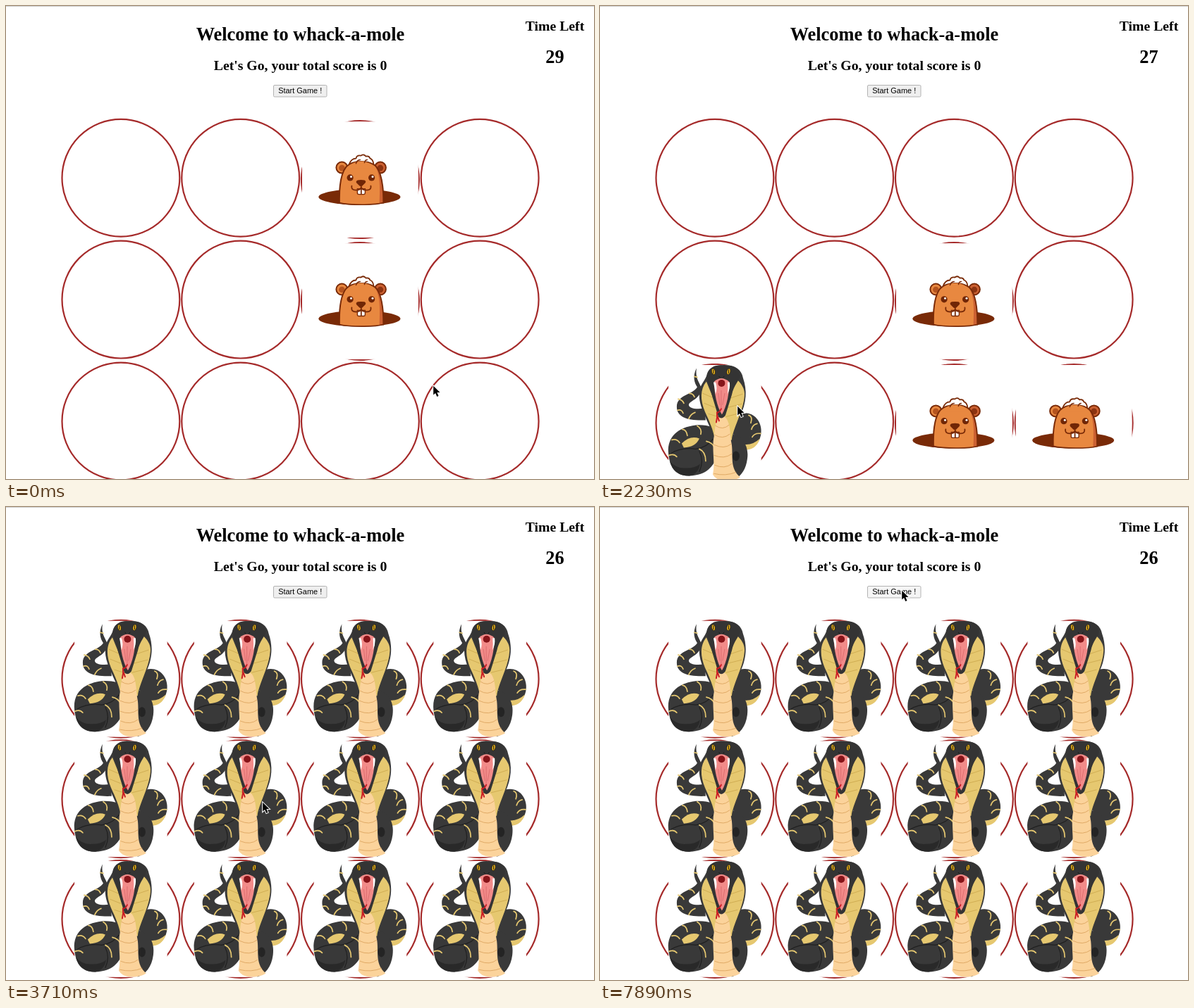
Animation, 834 px wide and 672 px high, one loop 8000 ms. Source, as an HTML page:

```html
<!DOCTYPE html>
<html lang="en">
<head>
<meta charset="utf-8">
<title>Whack-a-mole</title>
<style>
  html, body { margin: 0; width: 100%; height: 100%; overflow: hidden; background: #fff; }
  svg { display: block; width: 834px; height: 672px; }
  .title { font: bold 26.35px "Liberation Serif", "Times New Roman", serif; text-anchor: middle; }
  .sub { font: bold 19.75px "Liberation Serif", "Times New Roman", serif; text-anchor: middle; }
  .label { font: 10.95px "Liberation Sans", Arial, sans-serif; text-anchor: middle; }
  .line { fill: none; stroke-linecap: round; stroke-linejoin: round; }
</style>
</head>
<body>
<svg viewBox="0 0 834 672">
  <defs>
    <clipPath id="dome"><path d="M-29.5 33C-30 10-28-8-20-18C-11-28 14-28 23-18C31-8 33 10 33 33C21 36.5-15 36.5-29.5 33Z"/></clipPath>

    <g id="mole">
      <rect x="-82.4" y="-82.4" width="164.8" height="164.8" fill="#fff"/>
      <ellipse cx="-1" cy="24.7" rx="58" ry="11.2" fill="#792a07"/>
      <g stroke="#792a07" stroke-width="2">
        <circle cx="-26" cy="-17" r="8" fill="#e88840"/>
        <circle cx="28.5" cy="-17" r="8" fill="#cc6132"/>
      </g>
      <circle cx="-26" cy="-16.5" r="4.3" fill="#b4531f"/>
      <circle cx="28.5" cy="-16.5" r="4.3" fill="#8c3411"/>
      <g clip-path="url(#dome)">
        <rect x="-31" y="-30" width="66" height="68" fill="#e88840"/>
        <path d="M14-28C30-14 28 8 27 38H36V-30Z" fill="#cc6132"/>
      </g>
      <path class="line" d="M-29.5 33C-30 10-28-8-20-18C-11-28 14-28 23-18C31-8 33 10 33 33" stroke="#792a07" stroke-width="2"/>
      <path class="line" d="M-29.5 33C-15 36.5 21 36.5 33 33" stroke="#792a07" stroke-width="1.6"/>
      <path class="line" d="M-16-21Q-13-30-6-30Q-5-35 1-34Q5-37 8-33Q13-34 14-30Q18-29 19-22" fill="#e88840" stroke="#792a07" stroke-width="1.8"/>
      <path d="M-16-20Q2-32 19-20L16-16H-13Z" fill="#e88840"/>
      <path class="line" d="M-6-23Q-4-28 0-28M6-24Q7-28 10-28" stroke="#792a07" stroke-width="1.5"/>
      <g fill="#702606">
        <circle cx="-14.3" cy="-2.7" r="4.6"/>
        <circle cx="16.2" cy="-2.7" r="4.6"/>
        <path d="M-3.5.8Q1 .1 6 .8Q9 2 7 5L3 9Q1 10.500-1 9L-5 5Q-7 2-3.500 .8Z"/>
      </g>
      <circle cx="-12.9" cy="-4.2" r="1.5" fill="#fff"/>
      <circle cx="17.6" cy="-4.2" r="1.5" fill="#fff"/>
      <path d="M-4 13H7V19Q7 21 5 21H-2Q-4 21-4 19Z" fill="#fff" stroke="#792a07" stroke-width="1.4"/>
      <path class="line" d="M1.4 9V20M-12 9Q-13 15-6 15Q0 15 1.4 11Q3 15 9 15Q16 15 15 9" stroke="#792a07" stroke-width="1.8"/>
    </g>

    <g id="snake">
      <rect x="-65.8" y="-82.4" width="131.6" height="164.8" fill="#fff"/>
      <g transform="translate(-163 -244)">
        <g fill="#393939">
          <path d="M137 166C131 178 134 187 138 193C131 204 109 204 109 221C109 236 125 241 150 240L148 223C136 225 126 223 126 218C127 212 146 209 143 192C140 184 135 180 137 166Z"/>
          <path d="M198 231C218 225 232 243 228 262C225 276 214 283 204 281L188 258Z"/>
        </g>
        <path d="M202 274Q215 277 227 266Q221 283 205 282Z" fill="#e6c870"/>
        <path d="M97 285C96 264 110 250 136 247C152 246 166 250 168 258V287C161 306 152 318 127 319C106 320 98 304 97 285Z" fill="#393939"/>
        <path d="M99 298Q108 309 122 308Q136 308 142 302Q140 316 127 319Q104 319 99 298Z" fill="#292929"/>
        <path d="M116 273Q128 261 141 266Q136 278 119 279Z" fill="#e6c870"/>
        <path class="line" d="M101 287Q116 278 136 281Q153 278 160 267M141 284Q148 298 141 313" stroke="#202020" stroke-width="1.2"/>
        <path class="line" d="M111 210Q117 211 119 216M110 226Q116 224 118 230M126 238Q129 231 135 229M127 202Q132 202 134 207M134 178L138 179M102 268Q109 266 113 272M117 253Q123 254 124 262M138 248Q145 252 143 260M98 290Q105 287 109 292M141 281Q150 285 150 298M151 270Q160 272 163 280M211 233Q217 235 214 244M223 245Q217 246 215 253M228 259Q219 258 216 264" stroke="#e6c870" stroke-width="1.7"/>
        <path d="M184 260C201 260 212 276 209 295C207 312 198 322 187 326L173 300Z" fill="#393939"/>
        <ellipse cx="193" cy="291" rx="5" ry="7" fill="#242424"/>
        <path d="M152 174C155 164 168 161 178 162C192 162 201 168 203 180C209 197 208 215 199 234C194 246 189 256 188 270L163 268C155 242 139 222 141 200C142 188 150 184 152 174Z" fill="#393939"/>
        <path d="M151 185C142 196 142 211 149 228C155 241 161 254 163 268H187C188 253 204 226 205 205C206 196 201 188 194 182L173 239Z" fill="#e6c870"/>
        <path class="line" d="M146 202L160 208M148 216L163 222M154 231L167 235M202 203L184 209M201 217L181 222M195 231L179 235" stroke="#c9a64c" stroke-width=".8"/>
        <path d="M167 238Q173 231 179 237C186 247 184 260 187 275C189 292 184 308 199 321Q190 327 176 326Q164 325 160 317C164 300 158 280 162 262Q163 246 167 238Z" fill="#fbd39b"/>
        <path class="line" d="M164 248Q174 255 183 247M163 261Q174 268 184 260M162 275Q176 282 186 274M162 290Q176 296 187 288M163 304Q177 310 187 302M162 316Q178 320 193 314" stroke="#dda560" stroke-width=".9"/>
        <path d="M152 175C155 164 165 161 174 162C188 161 197 165 199 176C198 184 190 189 187 204L178 233Q173 240 168 235L159 205C157 191 151 185 152 175Z" fill="#343434"/>
        <path d="M162 185Q172 176 183 185C184 201 180 220 173 232C166 221 162 202 162 185Z" fill="#f28b89"/>
        <circle cx="172.500" cy="187.500" r="5" fill="#861419"/>
        <path class="line" d="M172 198V224M168 202L170 218M177 202L174 218" stroke="#d9686a" stroke-width=".8"/>
        <path d="M161 186Q163 195 164 203Q167 194 164 186ZM181 186Q182 195 181 203Q185 195 184 186Z" fill="#fff"/>
        <path class="line" d="M172 224Q169 230 166 229Q167 236 165 243M167 235L169 241" stroke="#ca1d24" stroke-width="2"/>
        <g fill="#f0b820" stroke="#111" stroke-width=".7">
          <ellipse cx="161" cy="171" rx="2.6" ry="4.4" transform="rotate(-12 161 171)"/>
          <ellipse cx="182.5" cy="171" rx="2.6" ry="4.4" transform="rotate(12 182.5 171)"/>
        </g>
        <path class="line" d="M161 168.5V173.5M182.5 168.5V173.5M169 178L170 179M176 178L175 179" stroke="#111" stroke-width="1"/>
      </g>
    </g>
  </defs>

  <rect width="834" height="672" fill="#fff"/>
  <rect width="834" height="1" fill="#cfcfcf"/>
  <text class="title" x="417.5" y="49">Welcome to whack-a-mole</text>
  <text class="sub" x="417.5" y="91">Let's Go, your total score is 0</text>
  <text class="sub" x="778.5" y="35">Time Left</text>
  <text class="title" x="778.5" y="81" id="clock">29</text>
  <rect id="button" x="379.5" y="112.5" width="75.5" height="16.5" rx="1.5" stroke="#b3b3b3"/>
  <text class="label" x="417.2" y="124.3">Start Game !</text>
  <g id="board"></g>
  <path id="cursor" d="M1.2 1.8V14.6L4.1 11.9L6.3 17L8.5 16L6.4 11.1H10.5Z" fill="#000" stroke="#fff" stroke-width="2" paint-order="stroke"/>
</svg>

<script>
const LOOP = 8000, TICK = 148.8, LEAD = 12;
const byId = id => document.getElementById(id);

// Who is in a hole: [row, column, kind, from tick, to tick]
const VISITS = [
  [0, 2, "mole", 0, 6], [1, 2, "mole", 0, 25], [2, 3, "mole", 2, 25],
  [0, 3, "mole", 6, 8], [2, 2, "mole", 9, 25], [1, 3, "mole", 19, 21],
  [2, 0, "snake", 6, 19], [1, 1, "snake", 19, 25]
];
const GAME_OVER = 25;

// Pointer path: [tick, x, y]
const PATH = [
  [0, 605, 538], [2, 615, 543], [11, 615, 543], [15, 194, 567], [19, 470, 547],
  [23, 363, 418], [31, 363, 418], [37, 585, 286], [38, 585, 286],
  [39, 604, 268], [44, 427, 116], [48, 427, 116], [49, 427, 117]
];

function make(tag, parent, attrs) {
  const el = document.createElementNS("http://www.w3.org/2000/svg", tag);
  for (const name in attrs) el.setAttribute(name, attrs[name]);
  return parent.appendChild(el);
}

const holes = [];
for (let row = 0; row < 3; row++) {
  for (let col = 0; col < 4; col++) {
    const g = make("g", byId("board"), {});
    make("circle", g, { r: 83.4, fill: "none", stroke: "#a52a2a", "stroke-width": 2.2 });
    holes.push({ row, col, g, guest: make("use", g, {}) });
  }
}

function guestAt(row, col, tick) {
  if (tick >= GAME_OVER) return "snake";
  const visit = VISITS.find(([r, c, , from, to]) => r === row && c === col && tick >= from && tick < to);
  return visit ? visit[2] : "";
}

function pointer(tick) {
  const next = PATH.findIndex(p => p[0] > tick);
  if (next < 0) return PATH[PATH.length - 1].slice(1);
  const [t0, x0, y0] = PATH[next - 1], [t1, x1, y1] = PATH[next];
  const u = (tick - t0) / (t1 - t0), e = u * u * (3 - 2 * u);
  return [x0 + (x1 - x0) * e, y0 + (y1 - y0) * e];
}

function draw(time) {
  const tick = Math.floor((time + LEAD) / TICK);
  const over = tick >= GAME_OVER;
  for (const { row, col, g, guest } of holes) {
    const kind = guestAt(row, col, tick);
    const y = over ? 244.2 + row * 170.6 : 244.2 + row * 172.9 + (kind ? 2.4 : 0);
    g.setAttribute("transform", `translate(${162.9 + col * 169.75} ${y})`);
    guest.setAttribute("href", "#" + (kind || "none"));
  }
  byId("clock").textContent = 29 - [6, 12, 19].filter(k => tick >= k).length;
  byId("button").setAttribute("fill", tick >= 53 ? "#f5f5f5" : tick >= 44 ? "#e5e5e5" : "#efefef");
  byId("cursor").setAttribute("transform", `translate(${pointer(tick)})`);
}

const start = performance.now();
function loop() {
  draw((performance.now() - start) % LOOP);
  requestAnimationFrame(loop);
}
loop();
</script>
</body>
</html>
```
